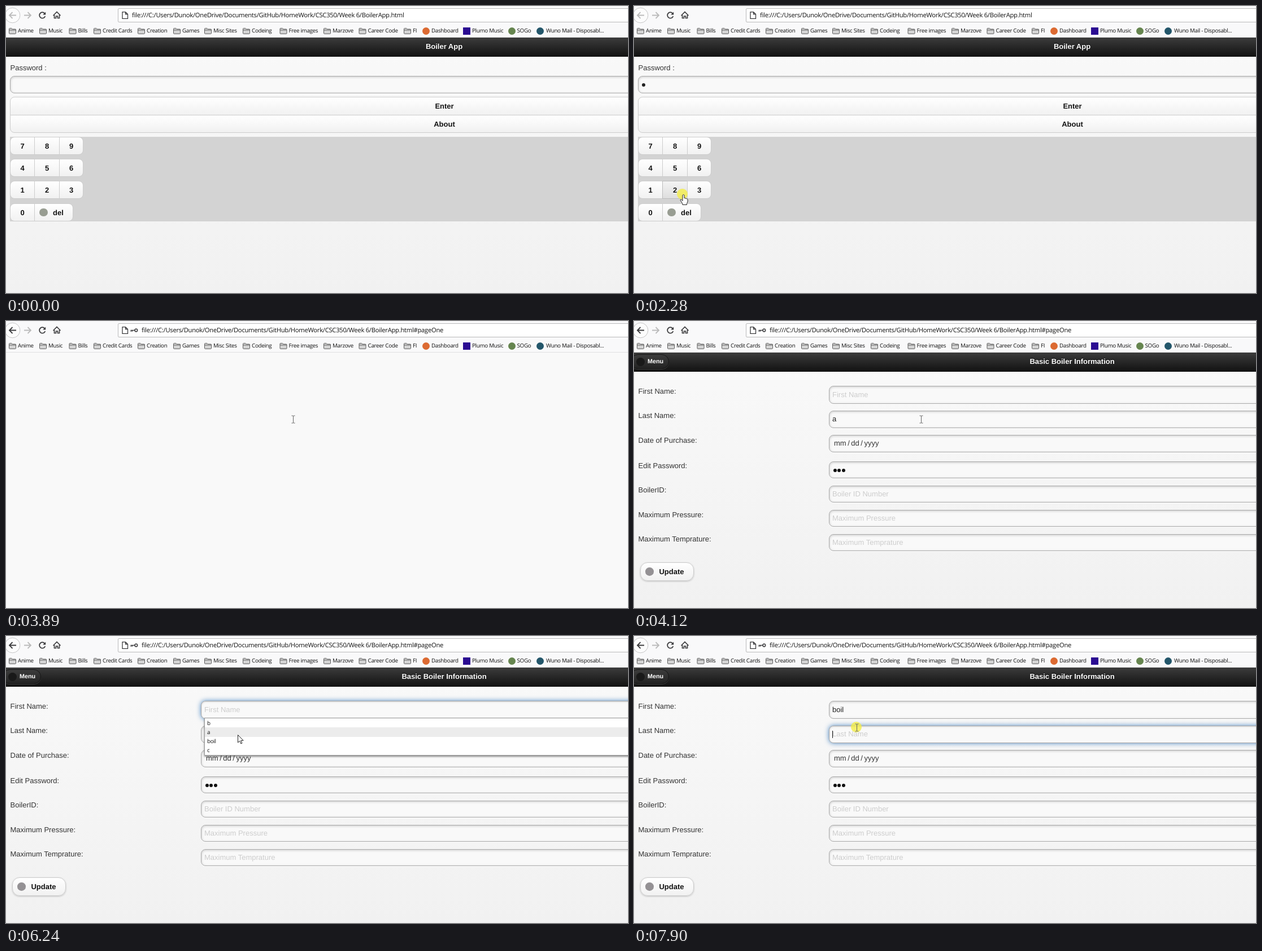
Write an HTML page that moves like this. It is 1101x509 px and loops after 7.99 s.

```html
<!DOCTYPE html>
<html lang="en">
<head>
<meta charset="utf-8">
<title>Boiler App</title>
<style>
  html, body { margin: 0; width: 100%; height: 100%; overflow: hidden; background: #f9f9f9; }
  #stage { position: relative; width: 1101px; height: 509px; overflow: hidden; background: #f9f9f9; text-rendering: geometricPrecision; }
  #stage div { position: absolute; box-sizing: border-box; }
  svg { position: absolute; left: 0; top: 0; overflow: visible; }
  .t { white-space: pre; line-height: 20px; font: 13px/20px "Liberation Sans", Arial, sans-serif; color: #333; }
  .b { font-weight: bold; }
  .mid { transform: translateX(-50%); }
  .ui { font: 9.8px/20px "Open Sans", sans-serif; letter-spacing: -.3px; color: #111; }
  .url { font-size: 11.2px; letter-spacing: -.25px; }
  .page { left: 0; top: 56px; width: 1551px; height: 453px; background: linear-gradient(#f9f9f9, #f1f1f1); }
  .page > .in { left: 0; top: -56px; width: 1551px; height: 509px; }
  .head { background: linear-gradient(#3c3c3c, #111); }
  .head + .t { color: #fff; text-shadow: 0 -1px 1px #000; }
  .btn { border: 1px solid #ccc; background: linear-gradient(#fff, #f1f1f1);
    font: bold 13px "Liberation Sans", Arial, sans-serif; color: #111; text-shadow: 0 1px 0 #fff;
    display: flex; align-items: center; justify-content: center; }
  .btn.over { background: linear-gradient(#f3f3f3, #dedede); border-color: #bbb; }
  .field { border: 1px solid #aaa; border-radius: 8px; background: #f9f9f9; box-shadow: inset 0 1px 4px rgba(0,0,0,.2), 0 1px 0 #fff; }
  .field.focus { box-shadow: inset 0 1px 3px rgba(0,0,0,.15), 0 0 9px rgba(56,123,190,.9); }
  .dot { border-radius: 50%; }
  .black { background: #111; }
  .hint { color: #cdcdcd; }
  .menu { border: 1px solid #151515; border-radius: 13px; background: linear-gradient(#3c3c3c, #232323); box-shadow: 0 1px 0 #3c3c3c; }
  .small { font-size: 10.8px; color: #fff; }
  .update { border-radius: 13px; box-shadow: 0 1px 3px rgba(0,0,0,.2); }
  .popup { background: #fff; border: 1px solid #999; box-shadow: 0 2px 3px rgba(0,0,0,.45); }
  .popup .row { left: 0; width: 100%; height: 16.3px; }
  .popup .over { background: #ececec; }
  .sel { background: #0a62b8; }
</style>
</head>
<body>
<div id="stage"></div>
<script>
const LOOP = 7990;
const box = (x, y, w, h, cls, body = '', style = '', id = '') =>
  `<div ${id && `id="${id}"`} class="${cls}" style="left:${x}px;top:${y}px;width:${w}px;height:${h}px;${style}">${body}</div>`;
const text = (x, y, str, cls = '', id = '') =>
  `<div ${id && `id="${id}"`} class="t ${cls}" style="left:${x}px;top:${y - 10}px">${str}</div>`;
const dot = (x, y, r, color, id) => box(x - r, y - r, 2 * r, 2 * r, 'dot', '', `background:${color}`, id);

// Browser toolbar
const folders = [['Anime', 21], ['Music', 75], ['Bills', 127.5], ['Credit Cards', 171], ['Creation', 249],
  ['Games', 312], ['Misc Sites', 367], ['Codeing', 435], ['Free images', 500.5], ['Marzove', 578],
  ['Career Code', 640.5], ['FI', 720]];
const sites = [['Dashboard', 753], ['Plumo Music', 825], ['SOGo', 904.5], ['Wuno Mail - Disposabl...', 956]];
const folderIcon = x => `<path d="M${x - 15.5} 48.5V40.5q0-1 1-1h3.5l1.5 1.5h5q1 0 1 1v6.5q0 .8-1 .8h-10q-1 0-1-.8zM${x - 15.5} 42.7h12"/>`;

function toolbar() {
  return box(0, 0, 1101, 56, '', '', 'background:#f9f9fa;border-bottom:1px solid #e0e0e1') +
    box(198, 4, 920, 25, '', '', 'background:#fff;border:1px solid #b9b9ba;border-radius:2px') +
    `<svg width="1101" height="56" fill="none" stroke="#3b3b3d" stroke-width="1.8">
      <circle cx="11.5" cy="16.5" r="13.3" fill="#fcfcfc" stroke="#c4c4c5" stroke-width="1"/>
      <path id="back" d="M18 16.5H6M11.5 11L6 16.5 11.5 22"/>
      <path stroke="#bbb" d="M32 16.5H44M38.5 11L44 16.5 38.5 22"/>
      <path d="M68.3 13A5.2 5.2 0 1 0 69.3 18"/><path d="M70.2 10.5V15.4H65.2Z" fill="#3b3b3d" stroke="none"/>
      <path stroke-width="1.6" d="M83.5 17L90 10.5 96.5 17M85.5 16V21.5H88.5V18H91.5V21.5H94.5V16"/>
      <path stroke-width="1.3" d="M206 10.6H211.5L215.5 14.5V22.4H206ZM211.5 10.6V14.5H215.5"/>
      <g id="key" stroke="#4a4a4c" stroke-width="1.7"><circle cx="230.3" cy="16.5" r="2.3"/><path d="M228 16.5H220.5M221.5 16V19M224 16V18.5"/></g>
      <g fill="#d4d4d4" stroke="#5c5c5c" stroke-width="1">${folders.map(f => folderIcon(f[1])).join('')}</g>
    </svg>` +
    text(223, 17, '', 'ui url', 'url') +
    [...folders, ...sites].map(([s, x]) => text(x, 44, s, 'ui')).join('') +
    dot(743, 44, 6.5, '#dc6a32') + box(809, 38, 13, 13, '', '', 'background:#2b0c92') +
    dot(895.5, 44, 6.5, '#66854f') + dot(945.5, 44, 6.5, '#23566a');
}

const header = title => box(0, 56, 1551, 34, 'head') + text(775.5, 72, title, 'b mid');
const page = (id, body) => `<div class="page" id="${id}"><div class="in">${body}</div></div>`;

// Login page
const buttons = [
  { x: 7, y: 161, w: 1538, h: 33, s: 'Enter', r: '8px 8px 0 0' },
  { x: 7, y: 193, w: 1538, h: 32, s: 'About', r: '0 0 8px 8px' }];
['789', '456', '123', '0'].forEach((row, i) => [...row].forEach((s, j) => buttons.push({
  x: [7, 50, 94][j], y: [232, 271, 310, 350][i], w: [44, 45, 43][j], h: 32, s,
  r: ['8px 0 0 8px', '0', '0 8px 8px 0'][j] })));
buttons.push({ x: 50, y: 350, w: 69, h: 32, s: 'del', r: '0 8px 8px 0', pad: 16 });

const login = page('login',
  header('Boiler App') + text(7.5, 110, 'Password :') +
  box(7, 124, 1538, 31, 'field') + dot(17, 140, 3, '#222', 'd1') + dot(24.5, 140, 3, '#222', 'd2') +
  box(7, 232, 1538, 150, '', '', 'background:#d3d3d3') +
  buttons.map((b, i) => box(b.x, b.y, b.w, b.h, 'btn', b.s, `border-radius:${b.r};padding-left:${b.pad || 0}px`, 'b' + i)).join('') +
  dot(66.5, 366, 7.3, '#989d92'));

// Form page: label, label y, field top, field height, hint
const fields = [['First Name:', 125, 115, 32, ''], ['Last Name:', 168, 159, 31, ''],
  ['Date of Purchase:', 212, 202, 31, ''], ['Edit Password:', 257, 249, 30, ''],
  ['BoilerID:', 300, 292, 30, 'Boiler ID Number'], ['Maximum Pressure:', 344, 335, 30, 'Maximum Pressure'],
  ['Maximum Temprature:', 387, 378, 30, 'Maximum Temprature']];
const options = ['b', 'a', 'boil', 'c'];

const form = page('form',
  header('Basic Boiler Information') +
  box(-6, 59, 68, 26, 'menu') + dot(11, 72, 7.5, '#191919') + text(24, 72, 'Menu', 'b small') +
  fields.map(([s, ly, y, h, hint], i) => text(7.5, ly, s) + box(345, y, 1200, h, 'field', '', '', 'f' + i) +
    text(351, y + 15, hint, 'hint')).join('') +
  box(351, 167, 8, 15, 'sel', '', '', 'sel') +
  text(351, 131, '', '', 'first') + text(351, 174, '', '', 'last') +
  `<div class="t" style="left:354px;top:207px;word-spacing:-1.1px">mm / dd / yyyy</div>` +
  [355.5, 363.3, 371].map(x => dot(x, 264.5, 3, '#111')).join('') +
  box(351, 125, 1, 13, 'black', '', '', 'caret') +
  box(11, 428, 95, 33, 'btn update', 'Update', 'padding-left:16px') + dot(27.5, 444.5, 7.3, '#949194') +
  box(351, 145, 1200, 67, 'popup', options.map((s, i) =>
    `<div class="row" id="o${i}" style="top:${i * 16.3}px">${text(4, 8.5, s, 'ui')}</div>`).join(''), '', 'popup'));

const cursor = `<svg width="1101" height="509"><g id="cur">
  <circle id="ring" cx="-1" cy="-1" r="9.5" fill="#f4ee48" opacity=".8"/>
  <path id="arrow" d="M0 0V13.5L3.2 10.6 5.3 15.5 7.4 14.6 5.3 9.8H9.6Z" fill="#fff" stroke="#222"/>
  <path id="beam" d="M-3-6.5H-1Q0-6.5 0-5.5Q0-6.5 1-6.5H3M0-5.5V5.5M-3 6.5H-1Q0 6.5 0 5.5Q0 6.5 1 6.5H3" fill="none" stroke="#666"/>
  <path id="hand" d="M-.5 1V11L-2.6 8.8Q-4.6 8-4.4 10L-.6 16V18H7V16Q9 13 8.6 9Q8.5 7.4 6.8 7.4Q6 6.2 4.6 6.8Q3.6 5.6 2.5 6.2V1Q1-1-.5 1Z" fill="#fff" stroke="#222"/>
</g></svg>`;

const $ = id => document.getElementById(id);
$('stage').innerHTML = login + form + toolbar() + cursor;

// Pointer moves: start, end, steps, x, y
const moves = [[210, 605, 6, 200, 276], [684, 1000, 5, 32, 334], [1370, 1800, 7, 73, 338], [1880, 1880, 1, 86, 334],
  [2500, 2990, 7, 470, 216], [3090, 3310, 4, 508, 174], [4510, 4840, 5, 425, 131], [6010, 6240, 4, 410, 175],
  [6390, 6560, 3, 408, 189], [6860, 7280, 7, 166, 203], [7350, 7350, 1, 248, 193], [7420, 7420, 1, 345, 233],
  [7510, 7900, 6, 394, 162]];
const clicks = [[1070, 1220], [2280, 2430], [3650, 3800], [4840, 5000], [5150, 5300], [5470, 5630], [6710, 6790], [7900, LOOP]];

function pointer(t) {
  let x = 936, y = 520;
  for (const [a, b, n, tx, ty] of moves) {
    if (t < a) break;
    const done = t >= b ? n : Math.floor((t - a) / (b - a) * (n - 1)) + 1;
    x += (tx - x) * done / n;
    y += (ty - y) * done / n;
  }
  return [x, y];
}

const within = (t, a, b) => t >= a && t < b;
const show = (id, on) => { $(id).style.visibility = on ? 'inherit' : 'hidden'; };
const put = (id, s) => { if ($(id).textContent !== s) $(id).textContent = s; };
const BASE = 'file:///C:/Users/Dunok/OneDrive/Documents/GitHub/HomeWork/CSC350/Week 6/BoilerApp.html';

function draw(t) {
  const [x, y] = pointer(t);
  const moved = t >= 3730, onForm = t >= 3880;

  put('url', BASE + (moved ? '#pageOne' : ''));
  $('url').style.left = (moved ? 240 : 223) + 'px';
  $('back').style.stroke = moved ? '#3b3b3d' : '#bbb';
  show('key', moved);

  $('login').style.opacity = t < 3730 ? 1 : t < 3810 ? .5 : 0;
  $('form').style.opacity = t < 3960 ? 0 : t < 4040 ? .35 : t < 4120 ? .75 : 1;
  show('d1', t >= 1220);
  show('d2', t >= 2430);

  let hot = false;
  buttons.forEach((b, i) => {
    const over = !onForm && !hot && x >= b.x && x < b.x + b.w && y >= b.y && y < b.y + b.h;
    hot = hot || over;
    $('b' + i).classList.toggle('over', over);
  });

  const popup = within(t, 5630, 6790), tabbed = t >= 7000, cleared = t >= 7660;
  show('popup', popup);
  $('popup').style.opacity = t < 5700 ? .6 : 1;
  const row = Math.floor((y - 146) / 16.3);
  options.forEach((_, i) => $('o' + i).classList.toggle('over', popup && i === row));

  $('f0').classList.toggle('focus', within(t, 4840, 7000));
  $('f1').classList.toggle('focus', tabbed);
  put('first', t < 6790 ? 'First Name' : 'boil');
  $('first').style.color = t < 6790 ? '#cdcdcd' : '#222';
  put('last', cleared ? 'Last Name' : 'a');
  $('last').style.color = cleared ? '#cdcdcd' : tabbed ? '#fff' : '#222';
  show('sel', tabbed && !cleared);
  show('caret', within(t, 4840, 5630) || cleared);
  $('caret').style.top = (cleared ? 168 : 125) + 'px';

  const inField = onForm && x > 346 && !(popup && y > 145) &&
    fields.some(([, , top, h], i) => i !== 2 && y > top && y < top + h);
  show('hand', hot);
  show('beam', inField);
  show('arrow', !hot && !inField);
  show('ring', clicks.some(([a, b]) => within(t, a, b)));
  $('cur').setAttribute('transform', `translate(${Math.round(x) + .5} ${Math.round(y) + .5})`);
}

function tick() {
  draw(performance.now() % LOOP);
  requestAnimationFrame(tick);
}
tick();
</script>
</body>
</html>
```
